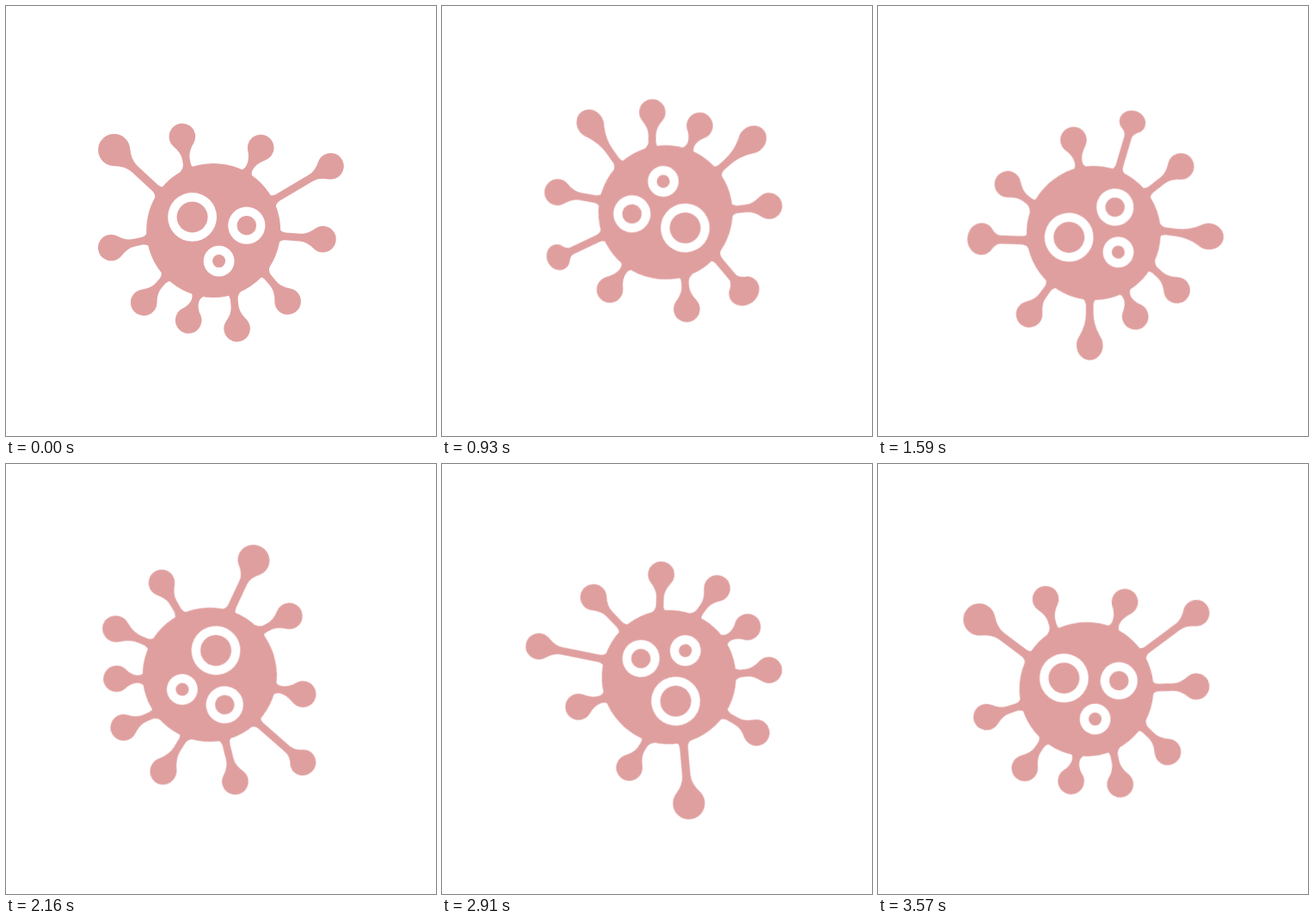
An HTML page that plays this animation: 500x500 px, repeating every 3600 ms.

```html
<!DOCTYPE html>
<html lang="en">
<head>
<meta charset="utf-8">
<title>Rolling germ</title>
<style>
  html, body { margin: 0; width: 100%; height: 100%; overflow: hidden; background: #fff; }
  svg { display: block; width: 100vw; height: 100vh; }
  .skin { fill: #e09f9f; }
  .ring { fill: #fff; }
  #germ { transform-origin: 250px 250px; animation: roll 1.8s steps(60) infinite; }
  @keyframes roll { to { transform: rotate(360deg); } }
</style>
</head>
<body>
<svg viewBox="0 0 500 500">
  <g id="germ">
    <g transform="translate(241.2 260.9)">
      <g id="arms" class="skin"></g>
      <circle class="skin" r="78"/>
      <g id="eyes"></g>
    </g>
  </g>
</svg>
<script>
const NS = 'http://www.w3.org/2000/svg';
const LOOP = 3600, STEP = 30, PEAK = 1225;
const BODY = 78, STRETCH = 0.172, RAD = Math.PI / 180;

// bulb centres: angle, reach
const BULBS = [
  [219, 148.6], [251.6, 115], [299.8, 110.7], [331.3, 155.4], [4.6, 127.7],
  [43.7, 119.6], [76.5, 117.5], [105.5, 108.5], [134, 116.6], [170.4, 120.6]
];
// x, y, ring radius
const EYES = [[-24.6, -15.5, 28.4], [38.6, -5.7, 21.6], [6.4, 35.7, 17.9]];

function add(parent, tag, attrs = {}) {
  const el = document.createElementNS(NS, tag);
  for (const k in attrs) el.setAttribute(k, attrs[k]);
  return document.getElementById(parent).appendChild(el);
}

const polar = (r, deg) => [r * Math.cos(deg * RAD), r * Math.sin(deg * RAD)];

// Roots sit a little aside of their bulbs
const rootAngle = a => a - 1.2 - 3.2 * Math.cos(2 * (a - 62) * RAD);

// Arm along +x from its root on the body, bulb centred at distance d
function armPath(d, r, scale) {
  const rx = r * scale, half = 2.2 + r / 7;
  const neck = Math.max(6, d - 1.75 * r * scale ** 3);
  const sx = d - 0.64 * rx, sy = 0.77 * r, bend = neck + 0.5 * (sx - neck);
  return `M-3 -9.5Q1 ${-half} 6 ${-half}L${neck} ${-half}Q${bend} ${-half} ${sx} ${-sy}` +
    `A${rx} ${r} 0 1 1 ${sx} ${sy}Q${bend} ${half} ${neck} ${half}L6 ${half}Q1 ${half} -3 9.5Z`;
}

const arms = BULBS.map(([angle, reach], i) => {
  const el = add('arms', 'path'), r = i ? 15.3 : 18.6;
  const [x0, y0] = polar(BODY, rootAngle(angle));
  // two arms of each five move: the first half shrinks, the second grows
  const moves = i % 5 % 3 === 0;
  const stretch = moves ? (i < 5 ? -STRETCH : STRETCH) : 0;
  return amount => {
    const scale = 1 + stretch * amount;
    const [x1, y1] = polar(reach * scale, angle);
    const turn = Math.atan2(y1 - y0, x1 - x0) / RAD;
    el.setAttribute('transform', `translate(${x0} ${y0}) rotate(${turn})`);
    el.setAttribute('d', armPath(Math.hypot(x1 - x0, y1 - y0), r, scale));
  };
});

for (const [cx, cy, r] of EYES) {
  add('eyes', 'circle', { class: 'ring', cx, cy, r });
  add('eyes', 'circle', { class: 'skin', cx, cy, r: r - 10.4 });
}

const roll = document.getElementById('germ').getAnimations()[0];
function tick() {
  const time = performance.now();
  roll.currentTime = time;
  const t = Math.floor((time % LOOP) / STEP) * STEP;
  const amount = Math.max(0, 1 - Math.abs(t - PEAK) / PEAK);
  arms.forEach(pose => pose(amount));
  requestAnimationFrame(tick);
}
tick();
</script>
</body>
</html>
```
